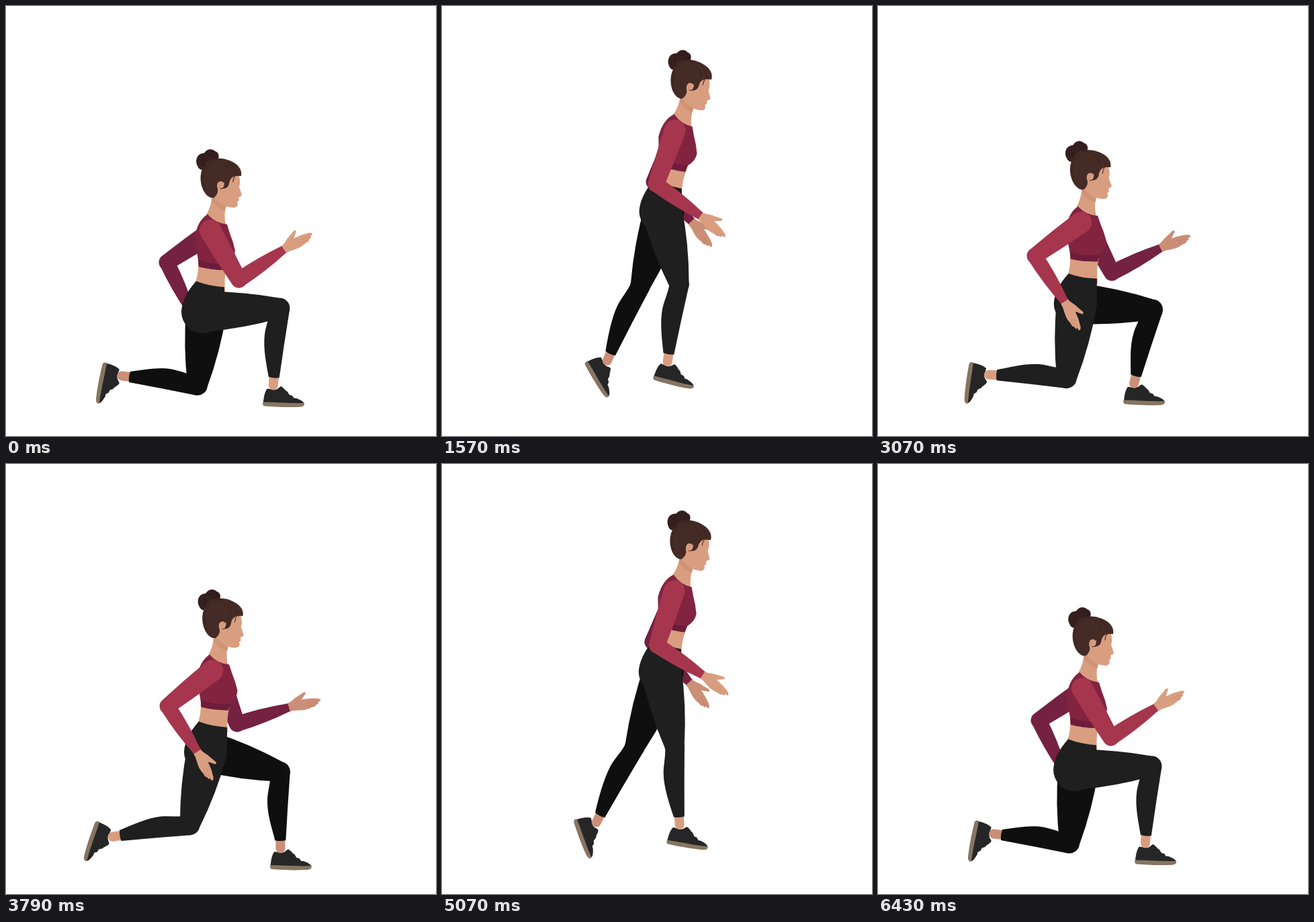
Recreate the animation shown at these times as an HTML page with a canvas. Size 640 by 640 pixels, loop 6.5 s.

```html
<!DOCTYPE html>
<html lang="en">
<head>
<meta charset="utf-8">
<title>Jump lunges</title>
<style>
html, body { margin: 0; width: 100%; height: 100%; overflow: hidden; background: #fff; }
canvas { display: block; width: 100vw; height: 100vh; }
</style>
</head>
<body>
<canvas id="stage"></canvas>
<script>
const LOOP = 6500, STEP = LOOP / 91;
const START = 120, APEX = 1875, LAND = 3190, TURN = 3360;
const canvas = document.getElementById('stage');
const ctx = canvas.getContext('2d');

const NEAR = { cloth: '#1f1f1f', sleeve: '#a5364d', skin: '#d99e80', line: '#c4866b', bone: 114 };
const FAR = { cloth: '#0f0f0f', sleeve: '#752142', skin: '#cb8f77', line: '#b67a63', bone: 112 };

// Jump from one lunge to the other; the way back runs through it in reverse
const jump = [
  { t: 70, reach: .94, mid: 285, near: [60, -34], far: [146, 64] },
  { t: 850, reach: 1.04, mid: 289, near: [86, 1], far: [130, 59] },
  { t: 1000, reach: .98, mid: 294, near: [90, 7], far: [127, 58] },
  { t: 2212, reach: -.48, mid: 286, near: [129, 56], far: [101, 25] },
  { t: 2780, reach: -1.06, mid: 285, near: [139, 57], far: [76, -8] },
  { t: 3070, reach: -.9, mid: 273, near: [144, 57], far: [62, -27] }
];

const rad = deg => deg * Math.PI / 180;
const polar = ([x, y], deg, len) => [x + Math.cos(rad(deg)) * len, y + Math.sin(rad(deg)) * len];

function ease(t, from, to) {
  const s = Math.min(1, Math.max(0, (t - from) / (to - from)));
  return (1 - Math.cos(Math.PI * s)) / 2;
}

// Monotone cubic through one value of the jump
function track(t, value) {
  const last = jump.length - 1;
  if (t <= jump[0].t) return value(jump[0]);
  if (t >= jump[last].t) return value(jump[last]);
  let i = 0;
  while (t >= jump[i + 1].t) i++;
  const slope = k => (value(jump[k + 1]) - value(jump[k])) / (jump[k + 1].t - jump[k].t);
  const tangent = k => {
    if (k === 0 || k === last) return 0;
    const a = slope(k - 1), b = slope(k);
    return a * b > 0 ? 2 * a * b / (a + b) : 0;
  };
  const h = jump[i + 1].t - jump[i].t, s = (t - jump[i].t) / h;
  const p = value(jump[i]), q = value(jump[i + 1]);
  return p + (q - p) * s * s * (3 - 2 * s)
    + h * s * (1 - s) * ((1 - s) * tangent(i) - s * tangent(i + 1));
}

function at(x, y, deg, draw) {
  ctx.save();
  ctx.translate(x, y);
  ctx.rotate(rad(deg));
  draw();
  ctx.restore();
}

function fill(color, d) {
  ctx.fillStyle = color;
  ctx.fill(new Path2D(d));
}

function stroke(color, width, d) {
  ctx.strokeStyle = color;
  ctx.lineWidth = width;
  ctx.lineCap = 'round';
  ctx.stroke(new Path2D(d));
}

// Tapered limb with a slight bulge of half width rm in the middle
function limb([x, y], deg, len, r0, rm, r1, color, flat) {
  const end = flat ? `L${len},${r1}` : `A${r1},${r1} 0 0 1 ${len},${r1}`;
  at(x, y, deg, () => fill(color,
    `M0,${-r0}Q${len / 2},${-rm} ${len},${-r1}${end}Q${len / 2},${rm} 0,${r0}A${r0},${r0} 0 0 1 0,${-r0}Z`));
}

function shoe() {
  fill('#262626', 'M-9,5C-13,10 -14,18 -15,27L46,28C46,24 42,22 34,19L31,19L28,15L24,14L21,9C18,8 17,5 15,4Q12,0 9,3Q4,8 -2,6Z');
  fill('#867562', 'M-15,25C5,25 25,27 46,26Q48,31 40,32C20,33 0,32 -13,31Q-17,29 -15,25Z');
}

// Reach runs from -1, toes down behind the body, to 1, flat in front
function leg(hip, reach, mid, look) {
  const r = Math.abs(reach), front = reach > 0;
  const x = mid + 120 * reach;
  const y = 516 + (front ? 53 * r ** 1.4 : 37 * r ** 1.15);
  const foot = front ? 30 * Math.max(0, 1 - r) ** 1.8 : 30 + 74 * r;

  // The knee bows forward from the line between hip and ankle
  const dx = x - hip[0], dy = y - hip[1], d = Math.hypot(dx, dy);
  const bow = Math.sqrt(Math.max(40, look.bone ** 2 - d * d / 4)) / d;
  const knee = [hip[0] + dx * .485 + dy * bow, hip[1] + dy * .485 - dx * bow];

  const angle = ([ax, ay], [bx, by]) => Math.atan2(by - ay, bx - ax) * 180 / Math.PI;
  const span = ([ax, ay], [bx, by]) => Math.hypot(bx - ax, by - ay);
  const len = span(knee, [x, y]), cuff = len - 12;
  at(x, y, foot, shoe);
  at(...knee, angle(knee, [x, y]), () => {
    fill(look.skin, `M${cuff - 3},-7L${len},-7A7,7 0 0 1 ${len},7L${cuff - 3},7Z`);
    fill(look.cloth, `M0,-15Q${cuff / 2},-11 ${cuff},-8Q${cuff + 2},0 ${cuff},8C${cuff - 20},13 62,20 40,19C26,18 16,14 0,14Z`);
  });
  limb(hip, angle(hip, knee), span(hip, knee), 30, 28, 15, look.cloth);
}

function arm(shoulder, upper, fore, look) {
  const elbow = polar(shoulder, upper, 85), wrist = polar(elbow, fore, 81);
  at(...wrist, fore + 2, () => {
    fill(look.skin, 'M-3,-6C6,-6 10,-11 16,-12L28,-16Q32,-14 27,-11L21,-6Q34,-5 45,-1Q50,2 47,4L43,4Q46,7 40,7Q38,10 33,9Q24,11 16,9Q6,6 -3,6Z');
    stroke(look.line, .6, 'M28,1L43,4M27,5L39,7');
  });
  limb(elbow, fore, 81, 11.5, 12, 6, look.sleeve, true);
  limb(shoulder, upper, 85, 16, 15, 12, look.sleeve);
}

function head() {
  const skin = NEAR.skin;
  fill(skin, 'M307,278Q306,298 298,311Q310,330 327,326Q324,312 327,298Z');
  fill('#cf9375', 'M307,282L306,290Q314,301 326,305L328,297Z');
  fill(skin, 'M314,250L346,250Q350,262 347,269L351,281Q351,283 347,284L346,287L347,289L344,292L345,295Q344,300 339,300Q325,301 310,286Z');
  fill('#35201f', 'M296,243Q288,246 285,238C281,230 284,219 295,219C298,213 306,211 311,216C318,218 318,226 314,231Z');
  fill('#452b25', 'M350,253C352,243 345,235 333,230C319,224 302,226 296,236C287,247 288,266 296,278C300,284 306,287 310,285C314,281 316,277 315,272L325,262Q325,268 322,272Q330,272 332,265C333,259 335,255 341,253Z');
  fill(skin, 'M317,276C312,269 314,260 320,261C325,261 326,268 321,272Z');
  stroke('#c4866b', .8, 'M318,271Q316,264 321,264');
  stroke('#452b25', 1.1, 'M319,272Q327,272 330,263M338,262Q338,256 342,252');
  stroke('#33201c', .9, 'M298,236Q288,252 296,274M315,229Q329,234 334,249M330,231Q340,239 343,250M297,240Q305,229 316,228');
  stroke('#281716', .9, 'M295,219Q290,227 295,238M297,220Q306,218 311,228M304,216Q312,217 313,226');
}

function torso() {
  fill(NEAR.skin, 'M286,382Q287,398 281,414L326,426Q324,405 329,388Z');
  fill('#822440', 'M300,310Q284,320 281,346Q283,362 286,378L287,388Q306,393 327,393L329,384Q340,376 341,364Q338,350 333,338L329,325Q311,323 300,310Z');
  fill('#6e1c3c', 'M286,377Q308,386 330,383L327,393Q306,393 287,388Z');
}

function pelvis([wx, wy], [hx, hy], lean) {
  const a = rad(12 + lean), dx = 21.5 * Math.cos(a), dy = 21.5 * Math.sin(a);
  fill(NEAR.cloth, `M${wx - dx},${wy - dy}Q${hx - 33},${hy - 22} ${hx - 34},${hy}A32,32 0 0 0 ${hx + 30},${hy}L${wx + dx},${wy + dy}Q${wx - 2},${wy + 3} ${wx - dx},${wy - dy}Z`);
}

function draw(time) {
  const back = time > TURN;
  const t = back ? 70 + (6430 - time) / .934 : time;
  const step = back ? t - 60 : t; // the feet lead on the way back

  const rising = t < APEX;
  const low = rising ? 1 - ease(t, START, APEX) : ease(t, APEX, LAND);
  const waist = [339 - 35 * low, 253 + (rising ? 161 : 152) * low];
  const lean = 7.5 - (rising ? 7.5 : 9.5) * low ** 1.37;
  const hip = [waist[0] - 9, waist[1] + 41];
  const shoulder = polar(waist, lean - 90, 80);
  const reach = track(step, p => p.reach), mid = track(step, p => p.mid);
  const swing = side => [0, 1].map(i => track(t, p => p[side][i]));

  ctx.fillStyle = '#fff';
  ctx.fillRect(0, 0, 640, 640);
  arm([shoulder[0] + 6, shoulder[1]], ...swing('far'), FAR);
  leg([hip[0] + 3, hip[1]], -reach, mid, FAR);
  at(...waist, lean, () => {
    ctx.translate(-304, -414);
    at(318, 305, -lean * .25, () => {
      ctx.translate(-318, -305);
      head();
    });
    torso();
  });
  pelvis(waist, hip, lean);
  leg(hip, reach, mid, NEAR);
  arm(shoulder, ...swing('near'), NEAR);
}

function frame() {
  const ratio = window.devicePixelRatio || 1;
  const w = Math.round(innerWidth * ratio), h = Math.round(innerHeight * ratio);
  if (canvas.width !== w || canvas.height !== h) {
    canvas.width = w;
    canvas.height = h;
  }
  ctx.setTransform(w / 640, 0, 0, h / 640, 0, 0);
  const t = (performance.now() + 8) % LOOP;
  draw(Math.floor(t / STEP) * STEP);
  requestAnimationFrame(frame);
}
frame();
</script>
</body>
</html>
```
